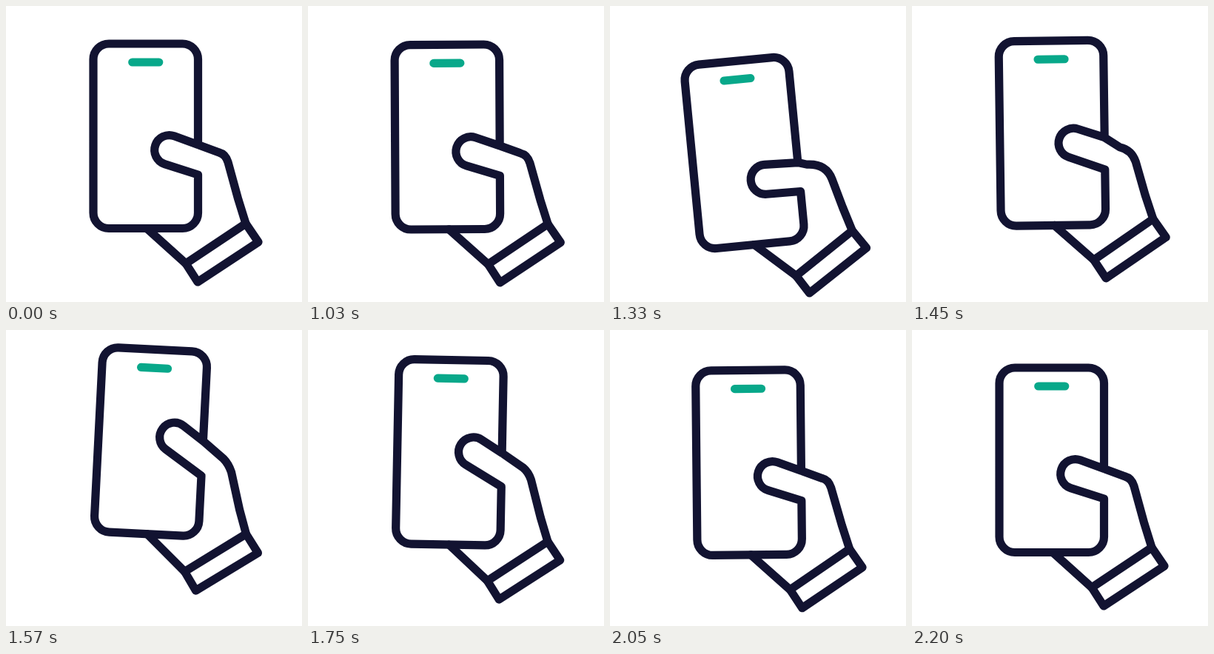
An HTML page that plays this animation: 400 px wide and 400 px high, repeating every 2230 ms.

```html
<!DOCTYPE html>
<html lang="en">
<head>
<meta charset="utf-8">
<title>Phone in hand</title>
<style>
  html, body { margin: 0; width: 100%; height: 100%; overflow: hidden; background: #fff; }
  svg { display: block; width: 100vw; height: 100vh; }
  path { fill: none; stroke: #121331; stroke-width: 11.2; stroke-linecap: round; stroke-linejoin: round; }
  #speaker { stroke: #08a88a; }
</style>
</head>
<body>
<svg viewBox="0 0 400 400">
  <path id="speaker"/>
  <path id="palm"/>
  <path id="cuff"/>
  <path id="outline"/>
</svg>
<script>
const LOOP = 2230, START = 1030, STEP = 30;

// phone x, y, angle; cuff x, y, angle
const REST = [188.75, 175.75, 0, 291.75, 333.5, 0];
const bodyKeys = [
  [995, REST],
  [1255, [179.7, 204.65, -6.58, 299.8, 349.85, -6.04]],
  [1600, [195.8, 149.95, 3.08, 290.55, 313.2, 2.35]],
  [1910, [186.5, 182.25, -1.1, 292.15, 338, -1.3]],
  [2200, REST]
];

// thumb centre x, y; lower and upper joint on the phone edge; knuckle start x, y and end x, y
const GRIP = [31.75, 18.75, 52.25, 11.75, -3.75, -135.5, 8.25, -122.5];
const gripKeys = [
  [995, GRIP],
  [1255, [24.1, 43.8, 61, 22.8, -23.3, -133.3, 11.45, -109.9]],
  [1618, [32.3, -9.6, 41.8, -5.7, -1.2, -140.2, 9, -122.8]],
  [1972, GRIP]
];

const W = 70.75, H = 124.75, R = 21, THUMB = 20;
const ease = u => (1 - Math.cos(Math.PI * u)) / 2;

function pose(keys, t) {
  if (t <= keys[0][0]) return keys[0][1];
  for (let i = 1; i < keys.length; i++) {
    const [t0, a] = keys[i - 1], [t1, b] = keys[i];
    if (t < t1) {
      const e = ease((t - t0) / (t1 - t0));
      return a.map((v, n) => v + (b[n] - v) * e);
    }
  }
  return keys[keys.length - 1][1];
}

function placer(x, y, deg) {
  const a = deg * Math.PI / 180, c = Math.cos(a), s = Math.sin(a);
  return (u, v) => [x + u * c - v * s, y + u * s + v * c];
}

const fmt = p => p.map(n => n.toFixed(2)).join(" ");
const line = (...pts) => "M" + pts.map(fmt).join("L");
const arc = (r, large, p) => `A${r} ${r} 0 ${large} 1 ${fmt(p)}`;

// Thumb tip: lower edge from q, round the tip, upper edge to j
function thumbPath(c, q, j) {
  const toward = p => Math.atan2(p[1] - c[1], p[0] - c[0]);
  const spread = p => Math.acos(THUMB / Math.hypot(p[0] - c[0], p[1] - c[1]));
  const at = a => [c[0] + THUMB * Math.cos(a), c[1] + THUMB * Math.sin(a)];
  const a = toward(q) + spread(q);
  const b = toward(j) - spread(j) + 2 * Math.PI;
  return "L" + fmt(at(a)) + arc(THUMB, b - a > Math.PI ? 1 : 0, at(b)) + "L" + fmt(j);
}

const set = (id, d) => document.getElementById(id).setAttribute("d", d);

function draw(t) {
  const [px, py, pa, cx, cy, ca] = pose(bodyKeys, t);
  const [tx, ty, qy, jy, kx, ky, ex, ey] = pose(gripKeys, t);
  const phone = placer(px, py, pa), hand = placer(cx, cy, ca);
  const q = phone(W, qy), j = phone(W, jy);
  const wrist = hand(32.25, -39.5), heel = hand(-48.75, 14.5);

  set("speaker", line(phone(-18, -99.75), phone(18, -99.75)));
  set("palm", line(phone(1.5, H), heel));
  set("cuff", line(wrist, hand(49.25, -14.5), hand(-32.75, 39.5), heel) + "Z");

  set("outline",
    line(j, phone(W, R - H)) +
    `A${R} ${R} 0 0 0 ${fmt(phone(W - R, -H))}` +
    "L" + fmt(phone(R - W, -H)) +
    `A${R} ${R} 0 0 0 ${fmt(phone(-W, R - H))}` +
    "L" + fmt(phone(-W, H - R)) +
    `A${R} ${R} 0 0 0 ${fmt(phone(R - W, H))}` +
    "L" + fmt(phone(W - R, H)) +
    `A${R} ${R} 0 0 0 ${fmt(phone(W, H - R))}` +
    "L" + fmt(q) +
    thumbPath(phone(tx, ty), q, j) +
    "L" + fmt(hand(kx, ky)) +
    "Q" + fmt(hand(5, -133.2)) + " " + fmt(hand(ex, ey)) +
    "L" + fmt(hand(22.2, -71.8)) +
    "L" + fmt(wrist));
}

// The motion holds at first, then advances in even steps
function frame() {
  const t = performance.now() % LOOP;
  draw(t < START ? 0 : START + STEP * Math.floor((t - START) / STEP));
  requestAnimationFrame(frame);
}
frame();
</script>
</body>
</html>
```
